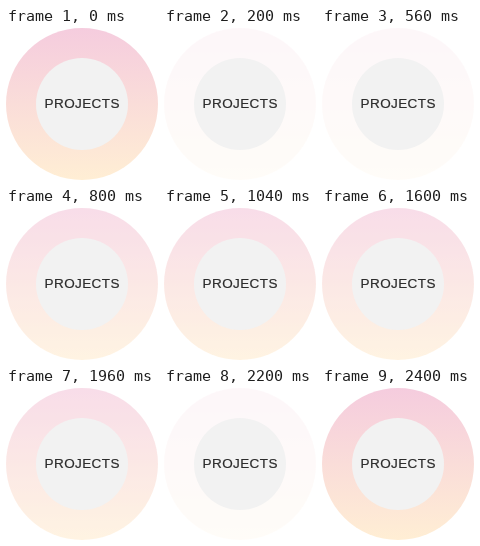
Recreate the animation shown at these times as an HTML page. Size 152 by 152 pixels, loop 2.6 s.

```html
<!DOCTYPE html>
<html lang="en">
<head>
<meta charset="utf-8">
<title>Projects</title>
<style>
  html, body { margin: 0; width: 100%; height: 100%; overflow: hidden; background: #fff; }
  svg { display: block; width: 152px; height: 152px; }
  text {
    font: 13.5px "Liberation Sans", Arial, sans-serif;
    letter-spacing: 0.4px;
    fill: #2b2b2b;
    stroke: #2b2b2b;
    stroke-width: 0.2px;
  }
</style>
</head>
<body>
<svg viewBox="0 0 152 152">
  <defs>
    <linearGradient id="blush" x1="0" y1="0" x2="0" y2="1">
      <stop offset="0" stop-color="#f5ccde"/>
      <stop offset="1" stop-color="#ffeed4"/>
    </linearGradient>
  </defs>
  <circle id="ring" cx="76" cy="76" r="76" fill="url(#blush)"/>
  <circle cx="76" cy="76" r="46" fill="#f2f2f2"/>
  <text x="38.6" y="80">PROJECTS</text>
</svg>
<script>
  const LOOP = 2600;
  // [start in ms, ring opacity]
  const steps = [[0, 1], [200, 0.15], [800, 0.66], [1200, 1], [1600, 0.66], [2200, 0.15], [2400, 1]];
  const keyframes = steps.map(([start, opacity]) => ({
    offset: start / LOOP, opacity, easing: 'step-end'
  }));
  keyframes.push({ offset: 1, opacity: 1 });
  document.getElementById('ring').animate(keyframes, { duration: LOOP, iterations: Infinity });
</script>
</body>
</html>
```
